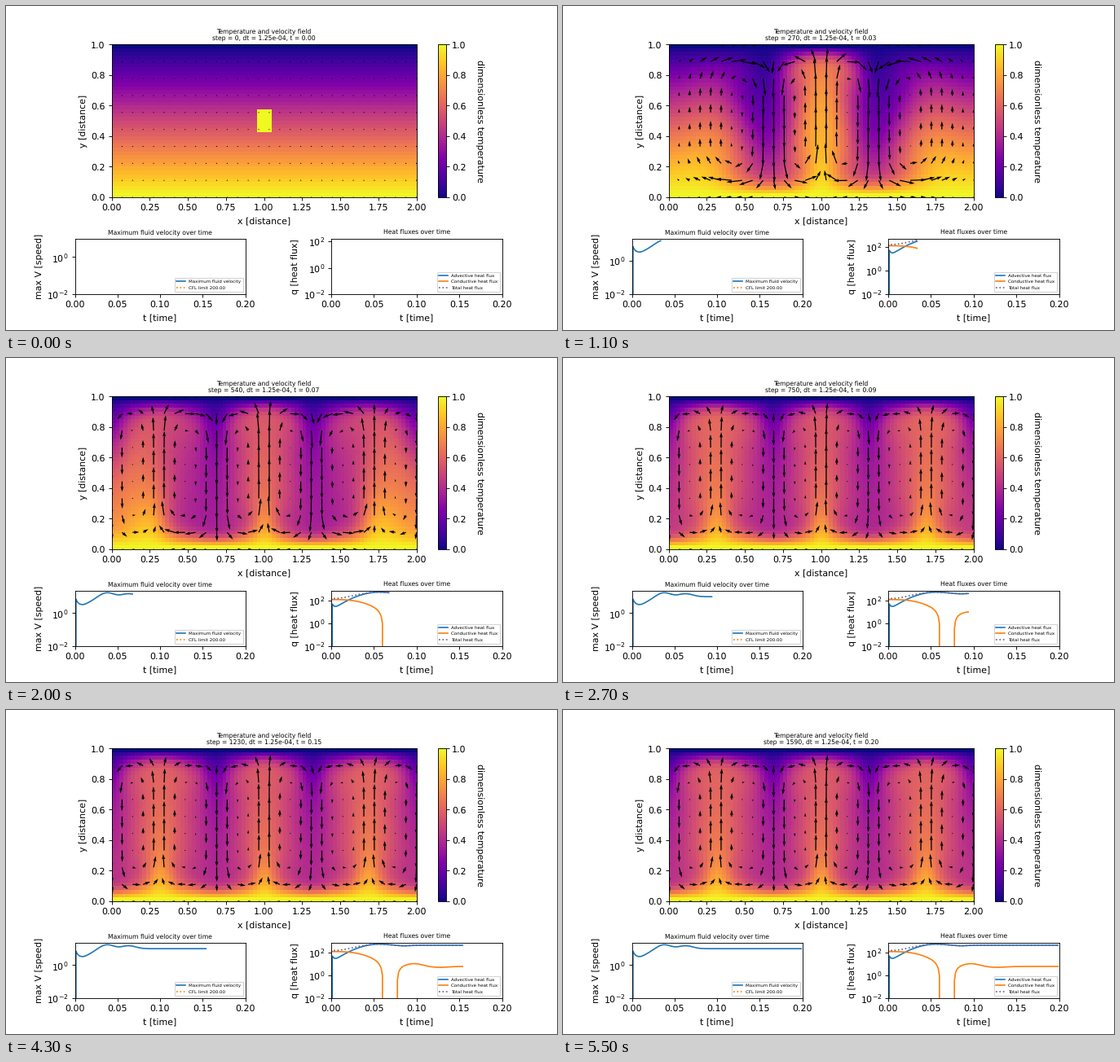
A matplotlib script for the animation above (5600 ms loop, 676 px wide and 398 px high).

```python
import numpy as np
import matplotlib.pyplot as plt
from matplotlib.animation import FuncAnimation
from matplotlib.ticker import NullLocator

W, H, DPI = 676, 398, 80
FRAMES, INTERVAL = 56, 100
NX, NY, DX, DT = 80, 40, 0.025, 1.25e-4
LAST, RECORD = 30 * (FRAMES - 1) - 60, 10

plt.rcParams.update({"font.family": "DejaVu Sans", "font.size": 9.86,
                     "text.hinting": "none"})
SMALL, TINY = 6.9, 4.93

times = np.arange(LAST + 1) * DT


def bump(t, center, width):
    return np.exp(-((t - center) / width) ** 2)


def ramp(t, start, end):
    s = np.clip((t - start) / (end - start), 0, 1)
    return s * s * (3 - 2 * s)


# Histories: a start-up spike, a rise, an overshoot and a steady state.
speed = (3.2 + 6.7 * ramp(times, 0.008, 0.038) + 7 * np.exp(-times / 0.002)
         + 7.3 * bump(times, 0.038, 0.01) + 5 * bump(times, 0.063, 0.011))
conductive = (6 + 114 * np.exp(-(times / 0.042) ** 3)
              - 15.5 * bump(times, 0.0665, 0.0115)
              + 4.5 * bump(times, 0.097, 0.012) - bump(times, 0.127, 0.015))
advective = (430 / (1 + np.exp((0.03 - times) / 0.009))
             + 60 * np.exp(-times / 0.002)
             + 130 * bump(times, 0.054, 0.016) - 50 * bump(times, 0.085, 0.01))

# Stream functions: one plume, then two broad side plumes, then steady rolls.
x = (np.arange(NX) + 0.5) * DX
y = (np.arange(NY) + 0.5) * DX
r = x - 1
phase = 3 * np.pi * (x + 0.02 * np.sin(2 * np.pi * x))
one = r * bump(r, 0, 0.23)
side = (r - 10 * r ** 3) * bump(r, 0, 0.387)
rolls = -(np.sin(phase) + 0.2 / 3 * np.sin(3 * phase)) / (3.6 * np.pi)

# Vertical profile with no slip at the floor and the ceiling.
profile = (1 - bump(y, 0, 0.15)) * (1 - bump(y, 1, 0.15))
slope = np.gradient(profile, DX)


def velocity(step):
    t = times[step]
    p, q = ramp(t, 0.018, 0.04), ramp(t, 0.05, 0.075)
    amp = 5.5 * speed[step] * (1 - q) + 85 * q
    stream = amp * ((1 - q) * ((1 - p) * one + p * side) + q * rolls)
    return -np.outer(slope, stream), np.outer(profile, np.gradient(stream, DX))


def advance(T, step):
    u, v = velocity(step)
    p = np.pad(T, 1, mode="edge")
    e, w, n, s = p[1:-1, 2:], p[1:-1, :-2], p[2:, 1:-1], p[:-2, 1:-1]
    T = T + DT * ((e + w + n + s - 4 * T) / DX ** 2
                  - (u * (e - w) + v * (n - s)) / (2 * DX))
    T[0], T[-1] = 1, 0
    return np.clip(T, 0, 1)


def step_of(frame):
    return max(10 * min(frame, 3), 30 * frame - 60)


def simulate():
    T = np.repeat(np.linspace(1, 0, NY)[:, None], NX, axis=1)
    T[17:23, 38:42] = 1
    fields, step = [], 0
    for frame in range(FRAMES):
        while step < step_of(frame):
            T = advance(T, step)
            step += 1
        fields.append(T)
    return fields


fields = simulate()
speed[0] = advective[0] = 0
total = advective + conductive

fig = plt.figure(figsize=(W / DPI, H / DPI), dpi=DPI, facecolor="white")


def axes(left, top, right, bottom):
    return fig.add_axes([left / W, 1 - bottom / H, (right - left) / W,
                         (bottom - top) / H])


main = axes(129.5, 47.5, 503.5, 235)
image = main.imshow(fields[0], origin="lower", extent=(0, 2, 0, 1), cmap="plasma",
                    vmin=0, vmax=1, aspect="auto")
pick = np.ix_(np.linspace(0, NY - 1, 10).astype(int),
              np.linspace(0, NX - 1, 30).astype(int))
still = np.zeros((10, 30))
arrows = main.quiver(np.linspace(0, 2, 30), np.linspace(0, 1, 10), still, still,
                     scale=DPI, scale_units="inches")
main.set(xlim=(0, 2), ylim=(0, 1), ylabel="y [distance]",
         xticks=np.arange(0, 2.1, 0.25), yticks=np.linspace(0, 1, 6))
main.set_xlabel("x [distance]", labelpad=4.8)
title = main.set_title("", fontsize=SMALL, pad=5.4, linespacing=1)

bar = fig.colorbar(image, cax=axes(530, 47.5, 539.5, 235))
bar.set_ticks(np.linspace(0, 1, 6))
fig.text(581.5 / W, 1 - 141 / H, "dimensionless temperature", rotation=270,
         ha="center", va="center")


def log_plot(left, right, name, ylabel, powers):
    ax = axes(left, 286, right, 354)
    ax.set_yscale("log")
    ax.set_title(name, fontsize=SMALL, pad=5.4)
    ax.set(xlim=(0, 0.2), ylabel=ylabel, xticks=np.linspace(0, 0.2, 5))
    ax.set_xlabel("t [time]", labelpad=4.8)
    ax.set_yticks([10.0 ** p for p in powers], [f"$10^{{{p}}}$" for p in powers])
    ax.yaxis.set_minor_locator(NullLocator())
    return ax


speed_ax = log_plot(84.5, 293.5, "Maximum fluid velocity over time",
                    "max V [speed]", (-2, 0))
flux_ax = log_plot(399, 608.5, "Heat fluxes over time", "q [heat flux]", (-2, 0, 2))
lines = []


def add_line(ax, label, data, color, style="-"):
    line, = ax.plot([], [], style, color=color, label=label, lw=1.5)
    lines.append((line, data))


add_line(speed_ax, "Maximum fluid velocity", speed, "C0")
add_line(speed_ax, f"CFL limit {DX / DT:.2f}", np.full_like(times, DX / DT), "C1", ":")
add_line(flux_ax, "Advective heat flux", advective, "C0")
add_line(flux_ax, "Conductive heat flux", conductive, "C1")
add_line(flux_ax, "Total heat flux", total, "#6b5b95", ":")
for ax in (speed_ax, flux_ax):
    ax.legend(loc="lower right", fontsize=TINY)


def draw(frame):
    step = step_of(frame)
    past = slice(0, step + 1, RECORD)
    image.set_data(fields[frame])
    u, v = velocity(step)
    # Arrow length in pixels grows with the root of the top speed.
    size = 7.4 * np.sqrt(speed[step]) / max(np.hypot(u, v).max(), 1e-9)
    arrows.set_UVC(u[pick] * size, v[pick] * size)
    title.set_text("Temperature and velocity field\n"
                   f"step = {step}, dt = {DT:.2e}, t = {step * DT:.2f}")
    for line, data in lines:
        line.set_data(times[past], data[past])
    speed_ax.set_ylim(1e-2, 1.3 * max(speed[past].max(), 7.3))
    flux_ax.set_ylim(1e-2, 1.28 * total[past].max())
    return image, arrows


anim = FuncAnimation(fig, draw, frames=FRAMES, interval=INTERVAL, repeat=True,
                     repeat_delay=0, init_func=lambda: draw(0), blit=False)
plt.show()
```
